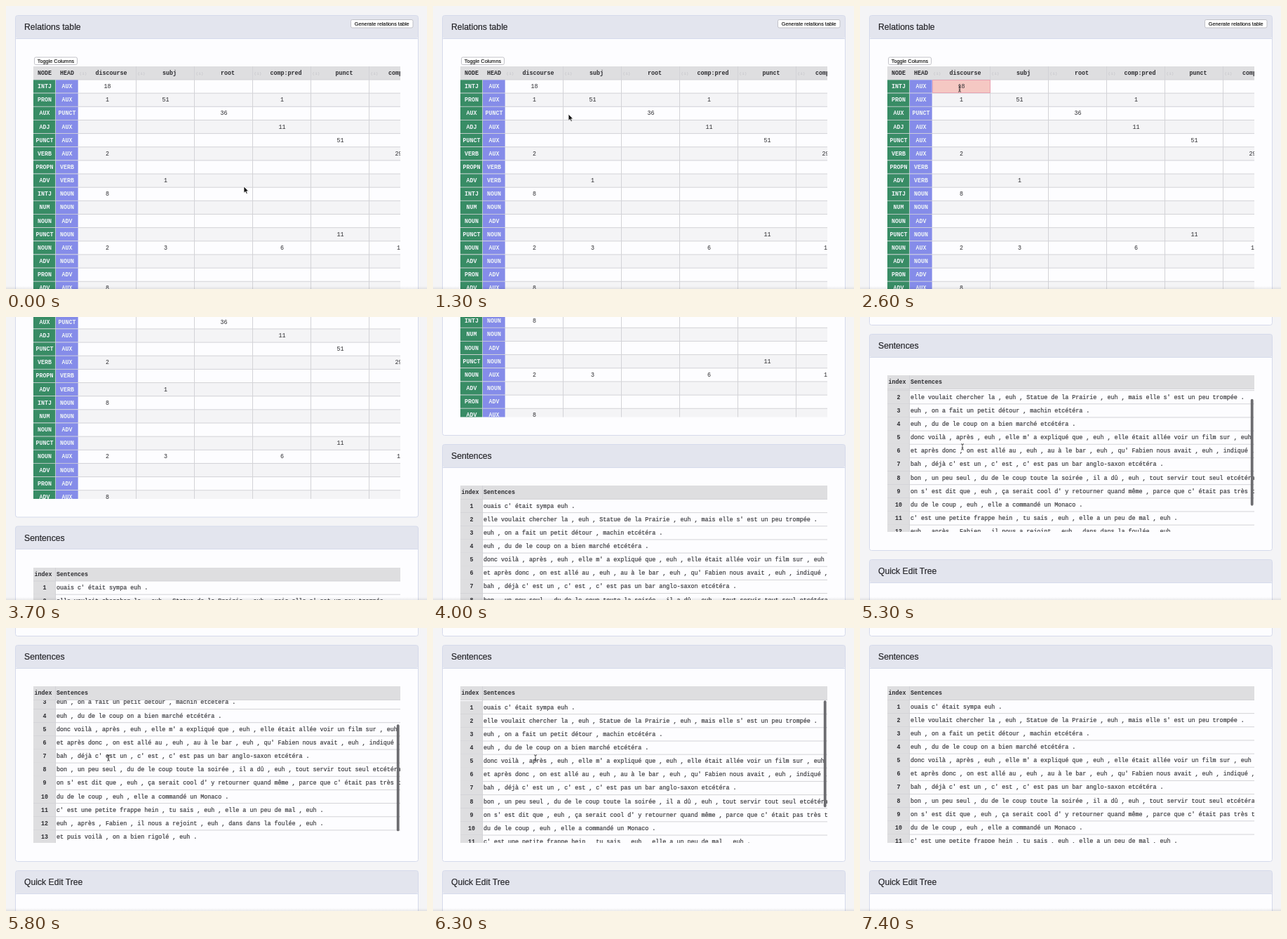
Animation, 600 px wide and 403 px high, one loop 7500 ms. Source, as an HTML page:

```html
<!DOCTYPE html>
<html lang="fr">
<head>
<meta charset="utf-8">
<style>
  html, body { margin: 0; width: 600px; height: 403px; overflow: hidden; background: #f4f4f6; }
  svg { display: block; }
  rect { shape-rendering: crispEdges; }
  .smooth { shape-rendering: auto; }
  text { font: 8.35px "Liberation Mono", "Courier New", monospace; fill: #2c2c30; }
  .mid { text-anchor: middle; }
  .bold { font-weight: bold; }
  .tag { fill: #eef3f6; }
  .icon { font-size: 6px; fill: #c2c2c7; }
  .line { fill: #3a3a3e; stroke: #3a3a3e; stroke-width: .2px; }
  .title { font: 12.2px "Liberation Sans", Arial, sans-serif; fill: #27272b; stroke: #27272b; stroke-width: .2px; }
  .button { font: 7.3px "Liberation Sans", Arial, sans-serif; fill: #000; stroke: #000; stroke-width: .1px; }
</style>
</head>
<body>
<svg id="stage" width="600" height="403" viewBox="0 0 600 403"></svg>
<script>
const LOOP = 7500, STEP = 100;
const ROW = 19.15, COL = 83, LEFT = 39, RIGHT = 562, DATA_X = 103, DATA_Y = 105;
const LIST_Y = 521.5, LIST_END = 725;
const GREY = '#dedee0', RULE = '#d3d3d7';

const columns = ['discourse', 'subj', 'root', 'comp:pred', 'punct', 'comp:obj'];
// node, head, then column:value pairs
const relations = [
  'INTJ AUX 0:18', 'PRON AUX 0:1 1:51 3:1', 'AUX PUNCT 2:36', 'ADJ AUX 3:11',
  'PUNCT AUX 4:51', 'VERB AUX 0:2 5:29', 'PROPN VERB', 'ADV VERB 1:1',
  'INTJ NOUN 0:8', 'NUM NOUN', 'NOUN ADV', 'PUNCT NOUN 4:11',
  'NOUN AUX 0:2 1:3 3:6 5:1', 'ADV NOUN', 'PRON ADV', 'ADV AUX 0:8'
].map(row => {
  const [node, head, ...cells] = row.split(' ');
  return { node, head, cells: new Map(cells.map(c => c.split(':').map(Number))) };
});
const sentences = [
  "ouais c' était sympa euh .",
  "elle voulait chercher la , euh , Statue de la Prairie , euh , mais elle s' est un peu trompée .",
  "euh , on a fait un petit détour , machin etcétéra .",
  "euh , du de le coup on a bien marché etcétéra .",
  "donc voilà , après , euh , elle m' a expliqué que , euh , elle était allée voir un film sur , euh ,",
  "et après donc , on est allé au , euh , au à le bar , euh , qu' Fabien nous avait , euh , indiqué , et",
  "bah , déjà c' est un , c' est , c' est pas un bar anglo-saxon etcétéra .",
  "bon , un peu seul , du de le coup toute la soirée , il a dû , euh , tout servir tout seul etcétéra .",
  "on s' est dit que , euh , ça serait cool d' y retourner quand même , parce que c' était pas très top .",
  "du de le coup , euh , elle a commandé un Monaco .",
  "c' est une petite frappe hein , tu sais , euh , elle a un peu de mal , euh .",
  "euh , après , Fabien , il nous a rejoint , euh , dans dans la foulée , euh .",
  "et puis voilà , on a bien rigolé , euh .",
  "donc , euh , c' était une bonne soirée ."
];

const rect = (x, y, w, h, fill, more = '') =>
  `<rect x="${x}" y="${y}" width="${w}" height="${h}" fill="${fill}" ${more}/>`;
const text = (x, y, s, cls = '') => `<text x="${x}" y="${y}" class="${cls}">${s}</text>`;
const label = (x, middle, s, cls) => text(x, middle + 2.5, s, cls);
const hline = y => rect(LEFT, y - .5, RIGHT - LEFT, 1, RULE, 'class="smooth"');
const vline = (x, y, h) => rect(x, y, 1, h, RULE);

function panel(y, bottom, title) {
  const box = `rx="3" class="smooth"`;
  return rect(13.5, y, 574, bottom - y, '#fdfdff', box) +
    rect(13.5, y, 574, 32.5, '#e3e5ee', box) +
    rect(13.5, y + 32, 574, 1, '#d5daeb') +
    rect(13.5, y, 574, bottom - y, 'none', box + ' stroke="#d5daeb"') +
    text(26, y + 20.5, title, 'title');
}

function button(x, y, w, h, s) {
  return rect(x, y, w, h, '#fff', 'rx="2" class="smooth" stroke="#bcbcc2" stroke-width=".9"') +
    text(x + w / 2, y + h / 2 + 2.6, s, 'button mid');
}

function relationTable() {
  let s = rect(LEFT, 86, RIGHT - LEFT, 19, GREY);
  s += label(55, 95.5, 'NODE', 'mid bold') + label(87, 95.5, 'HEAD', 'mid bold');
  relations.forEach(({ node, head, cells }, i) => {
    const y = DATA_Y + i * ROW, mid = y + ROW / 2;
    s += rect(DATA_X, y, RIGHT - DATA_X, ROW, i % 2 ? '#f4f4f6' : '#fdfdff');
    s += hline(y);
    s += rect(LEFT, y + .3, 31.4, ROW - .6, '#388c65', 'class="smooth"') +
      rect(71, y + .3, 31.7, ROW - .6, '#858ce9', 'class="smooth"');
    s += label(55, mid, node, 'mid bold tag') + label(87, mid, head, 'mid bold tag');
    cells.forEach((value, c) => s += label(DATA_X + c * COL + 41.5, mid, value, 'mid'));
  });
  columns.forEach((name, c) => {
    const x = DATA_X + c * COL;
    s += (c ? vline(x - 1, 86, 320) : '') + label(x + 7, 95, '(i)', 'mid icon') +
      label(x + 47, 95.5, name, 'mid bold');
  });
  return s;
}

function sentenceRows() {
  return sentences.map((line, i) => {
    const y = LIST_Y + i * ROW, mid = y + ROW / 2;
    return rect(LEFT, y, 32, ROW, GREY) + hline(y + ROW) +
      label(55, mid, i + 1, 'mid bold') + label(72, mid, line, 'line');
  }).join('');
}

const stage = document.getElementById('stage');
stage.innerHTML = `
  <defs>
    <clipPath id="tableClip"><rect x="39" y="86" width="523" height="318.5"/></clipPath>
    <clipPath id="listClip"><rect x="39" y="${LIST_Y}" width="523" height="${LIST_END - LIST_Y}"/></clipPath>
    <linearGradient id="edge" x2="0" y2="1"><stop stop-opacity="0"/><stop offset="1" stop-opacity=".08"/></linearGradient>
  </defs>
  <g id="page">
    ${panel(13.5, 430.5, 'Relations table')}
    ${button(491.5, 19.5, 88.5, 11.5, 'Generate relations table')}
    ${button(40.5, 73, 61, 10.5, 'Toggle Columns')}
    <g clip-path="url(#tableClip)">${relationTable()}<g id="hover"></g></g>
    ${panel(443.5, 751.5, 'Sentences')}
    <g clip-path="url(#listClip)"><g id="list">${sentenceRows()}</g></g>
    ${rect(LEFT, 502, RIGHT - LEFT, 19, GREY)}${hline(521.5)}
    ${label(53, 511.5, 'index', 'mid bold')}${label(72, 511.5, 'Sentences', 'bold')}
    ${vline(70, 502, LIST_END - 502)}
    ${rect(556.8, 523, 3.8, 152, '#6c6c70', 'id="thumb" rx="1.9" class="smooth"')}
    ${panel(764.5, 1000, 'Quick Edit Tree')}
  </g>
  ${rect(0, 399, 600, 4, 'url(#edge)')}
  <path id="arrow" d="M0 0V9.2L2.2 7.3 3.7 10.5 5.2 9.8 3.8 6.7H6.6Z" fill="#111" stroke="#fff" stroke-width=".7"/>
  <path id="beam" d="M-2-4.2Q0-4.2 0-3V3Q0 4.2-2 4.2M2-4.2Q0-4.2 0-3M0 3Q0 4.2 2 4.2M-1.2 1.5H1.2" fill="none" stroke="#222" stroke-width=".8"/>`;

const [page, hover, list, thumb, arrow, beam] =
  ['page', 'hover', 'list', 'thumb', 'arrow', 'beam'].map(id => document.getElementById(id));

const clamp = v => Math.min(1, Math.max(0, v));
const progress = (t, from, to) => clamp((t - from) / (to - from));
const smooth = u => u * u * (3 - 2 * u);
const move = (el, x, y) => el.setAttribute('transform', `translate(${x} ${y})`);
const show = (el, on) => el.setAttribute('visibility', on ? 'visible' : 'hidden');

function track(t, keys) {
  const i = keys.findIndex(k => k[0] > t);
  if (i < 1) return i ? keys[keys.length - 1][1] : keys[0][1];
  const [t0, a] = keys[i - 1], [t1, b] = keys[i];
  return a + (b - a) * (t - t0) / (t1 - t0);
}

function pageScroll(t) {
  if (t < 4000) return 262 * progress(t, 3300, 4000) ** 1.05;
  return 419 - 157 * (1 - progress(t, 4000, 4825)) ** 2;
}

const listKeys = [[4900, 0], [5100, 5], [5300, 17], [5600, 46], [5750, 50],
  [6000, 22], [6200, 1], [6300, -1], [6500, 0]];

function draw(t) {
  move(page, 0, -Math.round(pageScroll(t) * 2) / 2);
  const inner = track(t, listKeys);
  move(list, 0, -inner);
  move(thumb, 0, inner * .75);
  thumb.setAttribute('opacity', progress(t, 4900, 5100) * (1 - progress(t, 6600, 6900)));

  const u = smooth(progress(t, 300, 1800));
  const reading = t >= 5000;
  const x = reading ? 146 : 339 - 197 * u;
  const y = reading ? 185 : 257 - 139 * u;
  const c = Math.floor((x - DATA_X) / COL), r = Math.floor((y - DATA_Y) / ROW);
  const value = t < 3300 ? relations[r].cells.get(c) : undefined;
  const hit = value !== undefined;
  hover.innerHTML = hit
    ? rect(DATA_X + c * COL + .5, DATA_Y + r * ROW + .5, COL - 1, ROW - 1, '#f5c8c3', 'stroke="#e9a3b2"') +
      label(DATA_X + c * COL + 41.5, DATA_Y + (r + .5) * ROW, value, 'mid')
    : '';
  move(arrow, x, y);
  move(beam, x, y);
  show(arrow, t < 3300 && !hit);
  show(beam, hit || reading && t < 6800);
}

function tick() {
  draw(Math.floor(performance.now() % LOOP / STEP) * STEP);
  requestAnimationFrame(tick);
}
tick();
</script>
</body>
</html>
```
